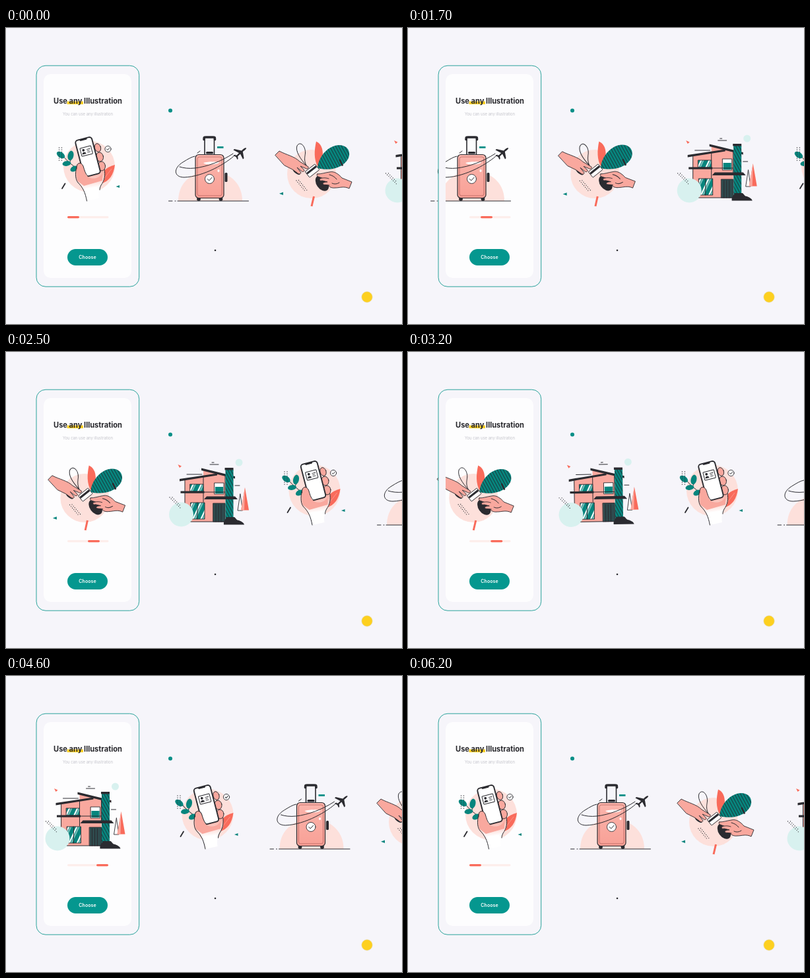
An HTML page for the animation above (6.3 s loop, 600x450 px).

```html
<!DOCTYPE html>
<html lang="en">
<head>
<meta charset="utf-8">
<title>Onboarding carousel</title>
<style>
html, body { margin: 0; width: 100%; height: 100%; overflow: hidden; background: #f6f5fa; }
svg { display: block; width: 600px; height: 450px; }
text { font-family: Inter, Lato, sans-serif; text-anchor: middle; }
.ln { fill: none; stroke: #2b2b30; stroke-width: 1; stroke-linecap: round; stroke-linejoin: round; }
.ol { stroke: #2b2b30; stroke-width: .9; stroke-linejoin: round; stroke-linecap: round; }
.k { fill: #2b2b30; }
.w { fill: #fff; }
.p { fill: #f9a89e; }
.soft { fill: #fde0db; }
.red { fill: #f96b5b; }
.teal { fill: #07857d; }
.mint { fill: #d8f1ef; }
.dots { fill: none; stroke: #2b2b30; stroke-width: 1.3; stroke-linecap: round; stroke-dasharray: 0 3.2; }
/* --k: how strongly an item swings while it settles in the phone */
.lean { transform: rotate(calc(var(--k) * -2.8deg)); }
.base { transform: rotate(calc(var(--k) * -.7deg)); }
.plane { transform: translate(calc(var(--k) * -25px), calc(var(--k) * 14px)); }
.trail { transform: scaleX(calc(1 - var(--k) * .28)); transform-origin: 257px 0; }
</style>
</head>
<body>
<svg viewBox="0 0 600 450">
<defs>
  <pattern id="hatch" width="4" height="4" patternUnits="userSpaceOnUse" patternTransform="rotate(-28)">
    <rect width="4" height="4" fill="#07857d"/><rect width="1" height="4" fill="#173c40"/>
  </pattern>
  <pattern id="glass" width="11" height="11" patternUnits="userSpaceOnUse" patternTransform="rotate(25)">
    <rect width="11" height="11" fill="#07857d"/><rect width="2.2" height="11" fill="#fff"/><rect x="3.6" width=".9" height="11" fill="#fff"/>
  </pattern>
  <linearGradient id="wrist" gradientUnits="userSpaceOnUse" x1="0" y1="230" x2="4" y2="260">
    <stop offset="0" stop-color="#f9a89e"/><stop offset=".4" stop-color="#fabcb3"/><stop offset="1" stop-color="#fff"/>
  </linearGradient>
  <linearGradient id="shell" x1="0" y1="0" x2="0" y2="1">
    <stop offset="0" stop-color="#fbb5ac"/><stop offset="1" stop-color="#f8a096"/>
  </linearGradient>

  <g id="item0"><g class="lean"><g transform="translate(-124.5 -263)">
    <circle class="soft" cx="126" cy="210.5" r="39"/>
    <path class="red" d="M143 231C145 217 152 212 165 208C163 223 157 233 143 237Z"/>
    <path d="M144 235L160 214" fill="none" stroke="#fba79d" stroke-width=".7"/>
    <path class="ln" d="M113 217C102 210 94 204 86 194M96 205L99 199M92 206L96 204"/>
    <g class="teal">
      <ellipse cx="83" cy="193" rx="7" ry="4.2" transform="rotate(35 83 193)"/>
      <ellipse cx="98" cy="194" rx="7.5" ry="4.4" transform="rotate(-78 98 194)"/>
      <ellipse cx="92" cy="206" rx="6.5" ry="3.8" transform="rotate(-8 92 206)"/>
      <ellipse cx="103" cy="214" rx="6" ry="4" transform="rotate(-30 103 214)"/>
    </g>
    <path class="dots" d="M80.5 182V203M84.5 182V203"/>
    <path fill="url(#wrist)" d="M108 208C105 220 104 229 109 235C117 243 120 250 122.500 263L141 259C139 248 143 241 148 233C151 226 150 218 149 212Z"/>
    <path class="ln" d="M108 208C105 216 104 229 109 235C117 243 120 250 122.500 263M149 214C151 225 149 232 144 239C142.500 242 142 244 142 246"/>
    <g class="p ol">
      <ellipse cx="139" cy="182" rx="4.5" ry="6.5" transform="rotate(-18 139 182)"/>
      <ellipse cx="142" cy="196" rx="5.5" ry="7" transform="rotate(-12 142 196)"/>
      <ellipse cx="145" cy="210" rx="5.5" ry="7" transform="rotate(-5 145 210)"/>
    </g>
    <g transform="translate(124 196) rotate(-14.6)">
      <rect x="-12.8" y="-28.5" width="25.6" height="57" rx="4" fill="#fff" stroke="#2b2b30" stroke-width="1.9"/>
      <path class="k" d="M-6 -28.5H6L5 -26H-5Z"/>
      <rect class="ln" x="-8.5" y="-15.5" width="17" height="12.5" rx=".8"/>
      <g class="k">
        <circle cx="-4" cy="-11.5" r="1.9"/><path d="M-7 -5.5C-7 -9.5 -1 -9.5 -1 -5.5Z"/>
        <path d="M1 -12H6.5V-11H1ZM1 -9.5H5V-8.7H1ZM1 -7.2H6V-6.5H1Z"/>
      </g>
    </g>
    <path class="p" d="M107.5 211C107 204 114 203 117 210C119 216 120 223 125 227C134 231 142 227 146 221L146 232L118 240L108 232Z"/>
    <path class="ln" d="M107 214C106 204 114 203 117 210C119 216 120 222 124 225"/>
    <circle class="w ol" cx="154.5" cy="184" r="4.6"/>
    <path class="ln" d="M152.5 184L154 185.6L156.7 182.5"/>
    <path class="ln" style="stroke-width:1.8" d="M85 244L89.5 236.5"/>
    <path class="teal" d="M166.5 241L172 239V243Z"/>
  </g></g></g>

  <g id="item1">
    <g class="base"><g transform="translate(-307 -263)">
      <path class="soft" d="M261 263C261 202 358 202 358 263Z"/>
      <path class="ln" d="M246.5 263H252M256 263H257M260 263H367.5"/>
    </g></g>
    <g class="lean"><g transform="translate(-307 -263)">
      <path class="ln" style="stroke-width:1.6" d="M301 193V168M315.5 193V168"/>
      <path class="ln" style="stroke-width:3.6" d="M300 169.5C300 166 300 166 303 166H313.5C316.5 166 316.5 166 316.5 169.5"/>
      <rect class="k" x="303" y="188" width="11" height="3.6" rx="1.5"/>
      <circle class="k" cx="292" cy="260" r="2.9"/><circle class="k" cx="325.5" cy="260" r="2.9"/>
      <rect class="ol" x="287" y="192.5" width="43" height="66" rx="5" fill="url(#shell)" style="stroke-width:1.2"/>
      <rect x="290" y="196" width="37" height="59" rx="3" fill="none" stroke="#b8625e" stroke-width=".8"/>
      <path class="w" d="M299 205C306 203 316 203 323 204C322 208 303 209 299 205Z"/>
      <ellipse class="w" cx="322" cy="217" rx="1.6" ry="2"/>
      <rect class="k" x="331.5" y="220" width="4" height="14" rx="1.5"/>
      <path class="ln trail" d="M347 193C335 205 300 226 270 227C254 227 253 213 268 204C276 199 281 196 286 195M290 190L294 187M344 191C326 203 304 211 286 213C277 214 269 213 263 211"/>
      <circle class="w ol" cx="308.5" cy="229.5" r="7"/>
      <path class="ln" d="M305.3 229.5L307.7 232L312 227.3"/>
      <rect x="320" y="180" width="9.5" height="2.8" fill="#078f87"/>
      <path class="k plane" d="M364 182.5C362 181.8 359.5 184 357 186.5L346 184L344.5 185.5L353 190L349.5 193.5L345.5 193L344.5 194L348.5 196L350.5 200L351.6 199L351.2 195L355 191.5L359 199.5L360.5 198L358.8 188C361.5 185.8 364.5 184 364 182.5Z"/>
    </g></g>
  </g>

  <g id="item2"><g class="lean"><g transform="translate(-466 -263)">
    <circle class="soft" cx="463" cy="222" r="37"/>
    <path class="ln" d="M455 209C446 199 438 187 441 179C446 171 454 180 453.5 190C453 196 451 201 455 209"/>
    <path class="red" d="M470 172.5C482 178 483 196 473 212C466 200 467 186 470 172.5Z"/>
    <path fill="url(#hatch)" d="M472 213C473 195 489 178 505 178C519 178 524 191 517 201C507 215 487 217 472 213Z"/>
    <path class="ln" style="stroke-width:2.6;stroke-linecap:butt" d="M505.5 200L510 209.5"/>
    <ellipse class="k" cx="479" cy="236" rx="8.5" ry="13" transform="rotate(-35 479 236)"/>
    <ellipse class="k" cx="440" cy="218" rx="7" ry="3" transform="rotate(40 440 218)"/>
    <g transform="translate(464 217) rotate(-38)">
      <rect class="w ol" x="-9.5" y="-5.5" width="19" height="11" rx="1"/>
      <rect class="k" x="-9" y="-3" width="18" height="3"/>
    </g>
    <path class="p ol" stroke-width=".8" d="M408 193L414 187C425 193 437 195 445 203L458 211C459 214 456 215 453 213L446 210L452 216C452 219 449 219 447 217L441 212L447 220C446 223 443 222 441 220L434 215L422 209Z"/>
    <g class="p ol">
      <path d="M472 222C478 222 483 220 490 219C497 217 504 222 509 228L524 234L520 244C512 240 506 243 499 243C492 244 487 240 488 236L484 230L473 226C471 225 470 222 472 222Z"/>
      <path d="M489 229C483 227 479 228 476 229C474 231 476 233 479 232L487 234C483 234 480 235 480 237C481 239 485 238 490 239"/>
    </g>
    <path class="ln" d="M490 223C494 224 498 226 501 230M494 236C498 238 502 237 505 235"/>
    <path class="dots" d="M440 232L454 249M443.5 231.5L457.5 248.5"/>
    <path d="M466.5 256L463 271" stroke="#f96b5b" stroke-width="3"/>
    <path class="teal" d="M414 251.7L420 249.5V254Z"/>
  </g></g></g>

  <g id="item3"><g class="lean"><g transform="translate(-303.5 -263)">
    <circle class="mint" cx="353" cy="168" r="5.5"/>
    <path class="red" d="M260.5 171L266 173.5L263 176Z"/>
    <path class="ln" d="M274 186H297M309 171H322M312 168H315M338 203H342M347 203H354"/>
    <path class="p" d="M271 195L299 188V180L332 188V258H271Z"/>
    <path class="ln" d="M271 195V258M299 189V228M332 188V220"/>
    <path class="k" d="M263 193L320 184.5V187.5L263 196.5ZM296 176.5L347 189V192.5L296 180Z"/>
    <rect class="ol" x="279" y="201" width="20" height="11" fill="url(#glass)"/>
    <rect class="ol w" x="316" y="199" width="14" height="17"/>
    <rect class="teal" x="317" y="205" width="12" height="10"/>
    <rect class="k" x="264.5" y="211.5" width="36" height="3.2"/>
    <path class="ln" d="M300 213H332"/>
    <rect class="ol" x="280" y="229" width="21" height="25" fill="url(#glass)"/>
    <path class="ln" d="M290 229V254"/>
    <rect class="ol" x="314" y="230" width="18" height="28" fill="#2f4a4d"/>
    <path class="ln" d="M318 232V258M322 232V258M326 232V258"/>
    <circle class="mint" cx="265.5" cy="247" r="18.5"/>
    <path class="dots" d="M248 221L265 238M252 221L265 234.5"/>
    <rect x="332.5" y="179" width="12" height="79" fill="url(#hatch)"/>
    <rect class="k" x="331.5" y="176" width="13" height="3.5"/>
    <path class="k" d="M304 219.5H347L351 224H300ZM330 262.5C329 256 333 255 334 251H346C349 253 349 256 353 256C357 258 360 259 361 262.5Z"/>
    <path class="ln" d="M280 258H332"/>
    <path class="w ol" d="M354.8 216L351 241H358Z"/>
    <path class="red" d="M362 206L356 240.5H368Z"/>
    <path class="p" d="M362 206L356 240.5H361Z"/>
  </g></g></g>
</defs>

<rect width="600" height="450" fill="#f6f5fa"/>
<circle cx="249" cy="125.5" r="3" fill="#078f87"/>
<circle cx="317" cy="338" r="1.3" fill="#2b2b30"/>
<circle cx="547" cy="409" r="8.2" fill="#fdd01f" stroke="#e3d9b0" stroke-width=".6"/>

<rect x="57" y="70" width="133" height="310" rx="10" fill="#fdfdfe"/>
<g id="strip"></g>
<path fill="#f6f5fa" fill-rule="evenodd" d="M60 57H188A14 14 0 0 1 202 71V379A14 14 0 0 1 188 393H60A14 14 0 0 1 46 379V71A14 14 0 0 1 60 57ZM67 70A10 10 0 0 0 57 80V370A10 10 0 0 0 67 380H180A10 10 0 0 0 190 370V80A10 10 0 0 0 180 70Z"/>
<rect x="46" y="57.2" width="155.7" height="336" rx="14" fill="none" stroke="#2ba39b"/>

<rect x="92.5" y="111.5" width="24.5" height="4.5" fill="#fbd02a"/>
<text x="124" y="114.6" font-size="11.1" font-weight="700" fill="#26262b">Use any Illustration</text>
<text x="124" y="133" font-size="5.9" fill="#c3c3ca">You can use any illustration</text>
<rect x="93" y="286" width="62.5" height="3.2" rx="1.6" fill="#fdeeeb"/>
<rect id="bar" x="93" y="286" width="18" height="3.2" rx="1.6" fill="#f96b5b"/>
<rect x="93" y="336" width="61" height="25" rx="12.5" fill="#05978f"/>
<text x="123.5" y="351" font-size="7.1" font-weight="600" fill="#fff">Choose</text>
</svg>
<script>
const LOOP = 6300, START = 100, STEP = 1500, MOVE = 1000;
// resting centre of each item by slot: gone, in the phone, second, third, edge, waiting
const REST = [
  [-90, 124.5, 304, 466, 636, 800],
  [-90, 115, 307, 460.5, 623, 800],
  [-90, 123, 304.5, 466, 620, 800],
  [-90, 116, 303.5, 471, 631, 800]
];
const BAR = [93, 108.5, 124, 137];
// start softness and braking by slot: further items set off later
const EASE = [[1.7, 5], [1.7, 5], [2.2, 6.4], [2.8, 9.2], [2.8, 9.2]];

const strip = document.getElementById('strip');
const bar = document.getElementById('bar');
const uses = EASE.map(() =>
  strip.appendChild(document.createElementNS('http://www.w3.org/2000/svg', 'use')));

const ease = (u, [a, b]) => 1 - (1 - u ** a) ** b;
const mix = (a, b, k) => a + (b - a) * k;

function draw(ms) {
  const t = (ms - START + LOOP) % LOOP;
  const turn = Math.min(3, Math.floor(t / STEP));
  const u = Math.min(1, (t - turn * STEP) / MOVE);
  uses.forEach((el, i) => {
    const item = (turn + i) % 4;
    const x = mix(REST[item][i + 1], REST[item][i], ease(u, EASE[i]));
    const href = '#item' + item;
    if (el.getAttribute('href') !== href) el.setAttribute('href', href);
    el.setAttribute('transform', `translate(${x.toFixed(2)} 263)`);
    el.style.setProperty('--k', i === 1 ? Math.sin(Math.PI * u).toFixed(3) : 0);
  });
  bar.setAttribute('x', mix(BAR[turn], BAR[(turn + 1) % 4], ease(u, EASE[1])).toFixed(2));
}

const t0 = performance.now();
function tick() {
  draw((performance.now() - t0) % LOOP);
  requestAnimationFrame(tick);
}
tick();
</script>
</body>
</html>
```
